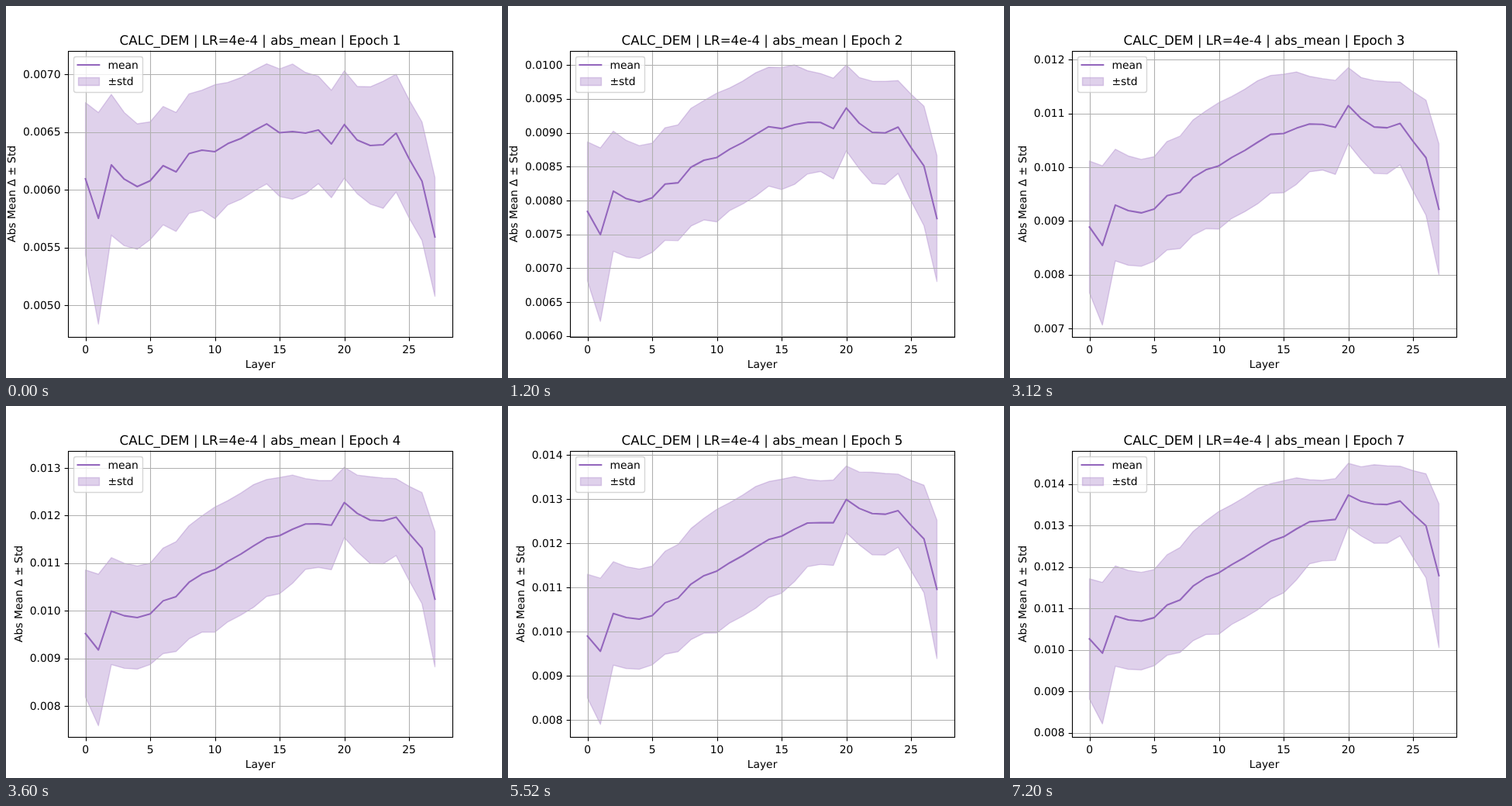
Write an HTML page with a canvas that moves like this. It is 640x480 px and loops after 8000 ms.

```html
<!DOCTYPE html>
<html lang="en">
<head>
<meta charset="utf-8">
<title>Mean and spread per layer</title>
<style>
  html, body { margin: 0; width: 100%; height: 100%; overflow: hidden; background: #fff; }
  canvas { display: block; }
</style>
</head>
<body>
<canvas id="stage" width="640" height="480"></canvas>
<script>
const ctx = document.getElementById('stage').getContext('2d');
const LOOP = 8000, STEP = 1200, LAST = 6;
const LEFT = 80, RIGHT = 576, TOP = 57.6, BOTTOM = 427.2;
const PURPLE = '#9467bd', FONT = '"DejaVu Sans", sans-serif';

// Values are in units of 1e-4. Every layer starts at its first mean and
// gains on it by a geometrically slowing amount; the spread does the same.
const firstMean = [
  60.96, 57.54, 62.17, 60.93, 60.29, 60.79, 62.1, 61.56, 63.14, 63.44, 63.31, 64.01, 64.45, 65.12,
  65.72, 64.95, 65.05, 64.92, 65.19, 63.98, 65.66, 64.31, 63.85, 63.91, 64.92, 62.7, 60.76, 55.93
];
// Key points [layer, value], joined by straight lines.
const meanGain = [[0, 41.7], [1, 41.7], [2, 46], [5, 47], [9, 54], [14, 60.5], [17, 66],
  [18, 66], [19, 67.5], [20, 71.7], [24, 71], [26, 69.2], [27, 62]];
const meanDecay = [[0, 0.602], [14, 0.604], [20, 0.635], [22, 0.664], [24, 0.667], [27, 0.693]];
const firstStd = [[0, 6.6], [1, 9.16], [2, 6.1], [5, 5.1], [9, 5.2], [10, 5.8], [11, 5.3],
  [14, 5.2], [16, 5.85], [18, 4.65], [21, 4.65], [23, 5.5], [24, 5.1], [27, 5.15]];
const stdGain = [[0, 7.9], [1, 7.9], [2, 6], [5, 6.5], [10, 9], [13, 9.4], [15, 8], [17, 4.9],
  [19, 5.2], [20, 3], [22, 4.4], [24, 3.3], [26, 7.4], [27, 12.2]];
const stdDecay = [[0, 0.55], [7, 0.56], [10, 0.61], [14, 0.61], [20, 0.44], [22, 0.44], [26, 0.51], [27, 0.7]];

// Lower and upper axis limit of each epoch.
const limits = [[47.255, 72.06], [59.84, 102.128], [68.392, 121.687], [73.453, 133.648],
  [76.161, 140.947], [78.182, 145.382], [78.991, 148.075]];

const layerX = i => 102.545 + 16.7003 * i;
const snap = v => Math.floor(v + 0.5) + 0.5;

function along(keys, x) {
  const k = Math.max(1, keys.findIndex(([kx]) => kx >= x));
  const [x0, y0] = keys[k - 1], [x1, y1] = keys[k];
  return y0 + (y1 - y0) * (x - x0) / (x1 - x0);
}

// Part of the total gain reached: 0 at the first epoch, 1 at the last.
const progress = (decay, epoch) => (1 - decay ** epoch) / (1 - decay ** LAST);
const grown = (start, gain, decay, i, epoch) =>
  start + along(gain, i) * progress(along(decay, i), epoch);

function stroke(points, color, width, cap = 'butt') {
  ctx.beginPath();
  points.forEach(([x, y]) => ctx.lineTo(x, y));
  ctx.strokeStyle = color;
  ctx.lineWidth = width;
  ctx.lineCap = cap;
  ctx.stroke();
}

function text(str, x, y, align = 'center', size = 13.89) {
  ctx.font = `${size}px ${FONT}`;
  ctx.textRendering = 'geometricPrecision';
  ctx.textAlign = align;
  ctx.fillStyle = '#000';
  ctx.fillText(str, x, y);
}

// Fills and outlines a path with the same translucent purple.
function shade(path) {
  ctx.fillStyle = ctx.strokeStyle = 'rgba(148, 103, 189, 0.3)';
  ctx.lineWidth = 1.39;
  ctx.fill(path);
  ctx.stroke(path);
}

function drawLegend() {
  const box = new Path2D();
  box.roundRect(87.5, 65.5, 89, 46, 2.78);
  ctx.fillStyle = 'rgba(255, 255, 255, 0.8)';
  ctx.strokeStyle = 'rgba(204, 204, 204, 0.8)';
  ctx.lineWidth = 1.39;
  ctx.fill(box);
  ctx.stroke(box);
  stroke([[92.5, 76], [120.3, 76]], PURPLE, 2.083, 'square');
  const patch = new Path2D();
  patch.rect(93.5, 92.5, 27, 10);
  shade(patch);
  text('mean', 131.4, 81, 'left');
  text('±std', 131.4, 102, 'left');
}

function drawChart(epoch) {
  const [low, high] = limits[epoch];
  const valueY = v => BOTTOM - (v - low) / (high - low) * (BOTTOM - TOP);
  const tickStep = high - low < 45 ? 5 : 10;
  const digits = tickStep === 5 ? 4 : 3;

  const mean = firstMean.map((m, i) => grown(m, meanGain, meanDecay, i, epoch));
  const std = mean.map((_, i) => grown(along(firstStd, i), stdGain, stdDecay, i, epoch));
  const curve = sign => mean.map((m, i) => [layerX(i), valueY(m + sign * std[i])]);

  ctx.fillStyle = '#fff';
  ctx.fillRect(0, 0, 640, 480);
  ctx.lineJoin = 'round';

  const band = new Path2D();
  [...curve(1), ...curve(-1).reverse()].forEach(([x, y]) => band.lineTo(x, y));
  band.closePath();
  shade(band);

  for (let layer = 0; layer <= 25; layer += 5) {
    const x = snap(layerX(layer));
    stroke([[x, TOP], [x, BOTTOM]], '#b0b0b0', 1.11);
    stroke([[x, 427.5], [x, 432.4]], '#000', 1.11);
    text(layer, layerX(layer), 448);
  }
  for (let v = Math.ceil(low / tickStep) * tickStep; v <= high; v += tickStep) {
    const y = snap(valueY(v));
    stroke([[LEFT, y], [RIGHT, y]], '#b0b0b0', 1.11);
    stroke([[75.6, y], [80.5, y]], '#000', 1.11);
    text((v / 1e4).toFixed(digits), 70.5, Math.floor(valueY(v) + 5.05), 'right');
  }
  stroke(curve(0), PURPLE, 2.083, 'square');

  ctx.strokeStyle = '#000';
  ctx.lineWidth = 1.11;
  ctx.lineJoin = 'miter';
  ctx.strokeRect(80.5, 58.5, 496, 369);

  text(`CALC_DEM | LR=4e-4 | abs_mean | Epoch ${epoch + 1}`, 328, 50, 'center', 16.67);
  text('Layer', 328, 467);
  ctx.save();
  ctx.translate(digits === 4 ? 12 : 21, 242.4);
  ctx.rotate(-Math.PI / 2);
  text('Abs Mean Δ ± Std', 0, 0);
  ctx.restore();
  drawLegend();
}

function frame() {
  drawChart(Math.floor((performance.now() % LOOP) / STEP));
  requestAnimationFrame(frame);
}
frame();
</script>
</body>
</html>
```
